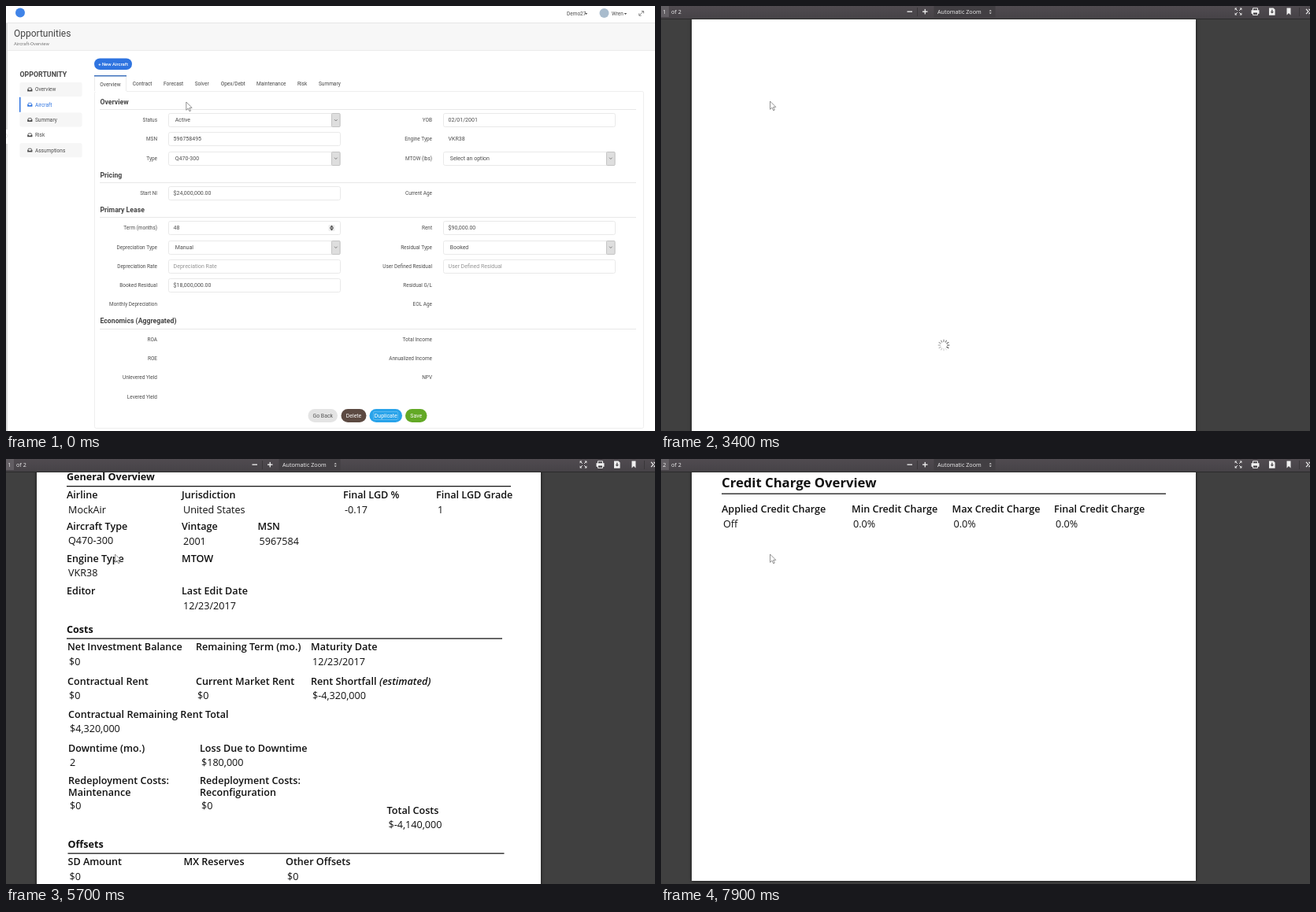
Animation, 824 px wide and 540 px high, one loop 8000 ms. Source, as an HTML page with a canvas:

```html
<!DOCTYPE html>
<html lang="en">
<head>
<meta charset="utf-8">
<title>Aircraft risk report</title>
<style>
html, body { margin: 0; width: 100%; height: 100%; overflow: hidden; background: #fff; }
canvas { display: block; width: 824px; height: 540px; }
</style>
</head>
<body>
<canvas id="stage" width="824" height="540"></canvas>
<script>
const ctx = document.getElementById('stage').getContext('2d');
const LOOP = 8000, STEP = 100;
const UI = 'Roboto, sans-serif', DOC = '"Open Sans", sans-serif';
const INK = '#4c4c4c', BLUE = '#2f74e0';
const PLANE = 'Q470-300', ENGINE = 'VKR38';

// ---------- helpers ----------
function text(s, x, y, size, color = INK, weight = 400, font = UI, align = 'left') {
  // laid out large and scaled down, so advances keep their fractions
  ctx.save();
  ctx.translate(x, y + size * 0.357);
  ctx.scale(0.125, 0.125);
  ctx.font = `${weight} ${size * 8}px ${font}`;
  ctx.textAlign = align;
  ctx.fillStyle = color;
  ctx.fillText(s, 0, 0);
  ctx.restore();
}

function rect(x, y, w, h, color) {
  ctx.fillStyle = color;
  ctx.fillRect(x, y, w, h);
}

function box(x, y, w, h, r, fill, stroke) {
  ctx.beginPath();
  ctx.roundRect(x, y, w, h, r);
  if (fill) { ctx.fillStyle = fill; ctx.fill(); }
  if (stroke) { ctx.strokeStyle = stroke; ctx.lineWidth = 1; ctx.stroke(); }
}

function poly(points, color) {
  ctx.beginPath();
  points.forEach(([x, y]) => ctx.lineTo(x, y));
  ctx.closePath();
  ctx.fillStyle = color;
  ctx.fill();
}

function line(points, color, width) {
  ctx.beginPath();
  points.forEach(([x, y]) => ctx.lineTo(x, y));
  ctx.strokeStyle = color;
  ctx.lineWidth = width;
  ctx.stroke();
}

function disc(x, y, r, color) {
  ctx.beginPath();
  ctx.arc(x, y, r, 0, 2 * Math.PI);
  ctx.fillStyle = color;
  ctx.fill();
}

const caret = (x, y, s, color, dir = 1) =>
  poly([[x - s, y - s * dir / 2], [x + s, y - s * dir / 2], [x, y + s * dir / 2]], color);

function track(keys, t) {
  if (t <= keys[0][0]) return keys[0][1];
  for (let i = 1; i < keys.length; i++) {
    const [t0, a] = keys[i - 1], [t1, b] = keys[i];
    if (t < t1) return a + (b - a) * (t - t0) / (t1 - t0);
  }
  return keys[keys.length - 1][1];
}

function ease(t, t0, t1) {
  const p = Math.min(1, Math.max(0, (t - t0) / (t1 - t0)));
  return p * p * (3 - 2 * p);
}

function cursor(x, y) {
  ctx.beginPath();
  [[0, 0], [0, 10.3], [2.4, 8.1], [4.2, 11.8], [5.7, 11.1], [4.1, 7.5], [7.3, 7.3]]
    .forEach(([a, b]) => ctx.lineTo(x + a, y + b));
  ctx.closePath();
  ctx.fillStyle = '#fff';
  ctx.fill();
  ctx.strokeStyle = '#777';
  ctx.lineWidth = 0.8;
  ctx.stroke();
}

// ---------- web application ----------
function frame(page) {
  rect(0, 0, 824, 540, '#fff');
  rect(0, 22, 824, 34, '#f7f7f7');
  rect(0, 21, 824, 1, '#e6e6e6');
  rect(0, 56, 824, 1, '#ececec');
  rect(0, 22, 2, 135, '#d9d9d9');
  rect(0, 175, 2, 365, '#d9d9d9');
  line([[0, 162], [2, 165], [0, 168]], '#ddd', 0.8);

  disc(18, 8.5, 6, '#4084e8');
  text('Demo27', 712, 9.5, 6.5);
  caret(736.5, 10, 1.8, INK);
  disc(759.5, 9, 6, '#a9bccd');
  text('Wren', 769, 9.5, 6.5);
  caret(786.5, 10, 1.8, INK);
  line([[804.2, 11.8], [809.2, 6.8]], '#777', 0.8);
  line([[806.8, 6.6], [809.6, 6.6], [809.6, 9.3]], '#777', 0.9);
  line([[803.8, 9.3], [803.8, 12.2], [806.6, 12.2]], '#777', 0.9);

  text('Opportunities', 10, 34.5, 12, '#444');
  text('Aircraft-' + page, 10, 47.5, 5.9, '#777');
  text('OPPORTUNITY', 17.5, 86.5, 8.8, '#444', 700);
  ['Overview', 'Aircraft', 'Summary', 'Risk', 'Assumptions'].forEach(sideItem);

  box(112, 66.5, 48, 14.5, 7.2, BLUE);
  text('+ New Aircraft', 136, 73.8, 5.9, '#fff', 500, UI, 'center');

  box(112.5, 108.5, 697, page === 'Risk' ? 460 : 428, 2, '#fff', '#eee');
  tabs(page);
}

function sideItem(name, i) {
  const y = 106 + i * 19.3, on = i === 1;
  if (i % 2 === 0) box(17.5, y - 9, 79, 18, 2, '#f6f6f6');
  if (on) rect(17, y - 9.5, 1.5, 19, BLUE);
  const color = on ? BLUE : INK;
  line([[27.6, y + 0.3], [28.6, y - 2], [32, y - 2], [33, y + 0.3]], color, 0.8);
  poly([[27.2, y], [29, y], [29.6, y + 0.9], [31, y + 0.9], [31.6, y], [33.4, y],
    [33.4, y + 2.4], [27.2, y + 2.4]], color);
  text(name, 37, y, 6.5, color);
}

function tabs(active) {
  const risk = active === 'Risk';
  const [left, right] = risk ? [362, 390] : [112, 153];
  rect(left, 88, right - left, 21, '#fff');
  rect(left, 88, 1, 20, '#ececec');
  rect(right - 1, 88, 1, 20, '#ececec');
  rect(left, 88, right - left, 1.5, '#3f72bd');
  const names = ['Overview', 'Contract', 'Forecast', 'Solver', 'Opex/Debt', 'Maintenance', 'Risk', 'Summary'];
  const at = [119.3, 160.7, 200, 239.7, 272.7, 318, 370, 397];
  names.forEach((n, i) => {
    const shift = risk && i > 0 && i < 6 ? -0.6 : 0;
    text(n, at[i] + shift, n === active ? 99.3 : 98.3, 6.5, '#444');
  });
}

function section(name, y) {
  text(name, 119.5, y, 8.7, '#444', 700);
  rect(119, Math.round(y + 9.5), 681, 1, '#e8e8e8');
}

// kinds: i input, p placeholder, s select, none plain
function row(side, y, label, value = '', kind = '') {
  const x = side ? 556 : 207;
  label.split('|').forEach((part, i) => text(part, x - 15, y + i * 10, 6.45, INK, 400, UI, 'right'));
  if (kind) box(x - 0.5, Math.round(y) - 8.5, 218, 17, 2, '#fff', '#e9e9e9');
  if (kind === 's') {
    const top = Math.round(y) - 8.5;
    box(x + 206.5, top, 10.5, 17, 1, '#dedede', '#c4c4c4');
    line([[x + 210, y - 0.8], [x + 211.8, y + 1], [x + 213.6, y - 0.8]], '#666', 0.8);
  }
  text(value, x + (kind === 's' ? 7.8 : 5.6), y, 7, kind === 'p' ? '#949494' : INK);
}

function stepper(x, y) {
  caret(x, y - 2.3, 2, '#333', -1);
  caret(x, y + 2.3, 2, '#333');
}

function pill(x, w, label, fill, color = '#fff') {
  box(x, 512, w, 17, 8.5, fill);
  text(label, x + w / 2, 520.7, 6.9, color, 400, UI, 'center');
}

function overview() {
  frame('Overview');
  section('Overview', 121.5);
  row(0, 145, 'Status', 'Active', 's');
  row(1, 145, 'YOB', '02/01/2001', 'i');
  row(0, 169, 'MSN', '596758495', 'i');
  row(1, 169, 'Engine Type', ENGINE);
  row(0, 193.5, 'Type', PLANE, 's');
  row(1, 193.5, 'MTOW (lbs)', 'Select an option', 's');
  section('Pricing', 214.5);
  row(0, 238, 'Start NI', '$24,000,000.00', 'i');
  row(1, 238, 'Current Age');
  section('Primary Lease', 258.5);
  row(0, 282, 'Term (months)', '48', 'i');
  box(409.5, 278, 8, 8, 1, '#eee');
  stepper(413.5, 282);
  rect(411, 281.5, 5, 1, '#333');
  row(1, 282, 'Rent', '$90,000.00', 'i');
  row(0, 306.5, 'Depreciation Type', 'Manual', 's');
  row(1, 306.5, 'Residual Type', 'Booked', 's');
  row(0, 331, 'Depreciation Rate', 'Depreciation Rate', 'p');
  row(1, 331, 'User Defined Residual', 'User Defined Residual', 'p');
  row(0, 355, 'Booked Residual', '$18,000,000.00', 'i');
  row(1, 355, 'Residual G/L');
  row(0, 379, 'Monthly Depreciation');
  row(1, 379, 'EOL Age');
  section('Economics (Aggregated)', 400);
  ['ROA', 'ROE', 'Unlevered Yield', 'Levered Yield'].forEach((s, i) => row(0, 423.7 + i * 24.2, s));
  ['Total Income', 'Annualized Income', 'NPV'].forEach((s, i) => row(1, 423.7 + i * 24.2, s));
  pill(383.5, 37.5, 'Go Back', '#e4e4e4', '#555');
  pill(425.5, 32, 'Delete', '#5c4a42');
  pill(461.5, 41.5, 'Duplicate', '#28a3ea');
  ctx.setLineDash([1, 1]);
  box(466.5, 515.5, 31, 10, 1, null, '#8accf2');
  ctx.setLineDash([]);
  pill(507, 27.5, 'Save', '#63a926');
}

function risk() {
  frame('Risk');
  section('General', 128.7);
  row(0, 152.5, 'Analyst', 'Analyst', 'p');
  box(412.5, 149.5, 7, 6, 0.5, null, '#888');
  line([[413.5, 152.5], [415, 152.5]], '#777', 2);
  line([[416, 151.5], [418.5, 151.5]], '#777', 0.7);
  line([[416, 153.5], [418.5, 153.5]], '#777', 0.7);
  row(1, 152.5, 'Type', PLANE);
  row(0, 176.5, 'YOB', '02/01/2001');
  row(1, 176.5, 'Jurisdiction', 'United States');
  section('Costs', 197.7);
  row(0, 221, 'Contract Remaining Rent', '$4,320,000.00');
  row(1, 221, 'Lost Rents Downtime', '$180,000.00');
  row(0, 245, 'Rent Shortfall', '-$4,320,000.00');
  row(1, 245, 'Redeployment Cost|Maint', 'Redeployment Cost Maint', 'p');
  row(0, 276, 'Risk Downtime', '2');
  row(1, 276, 'Total Costs', '-$4,140,000.00');
  section('Offsets', 296.7);
  row(0, 320.3, 'Maintenance Reserve');
  row(1, 320.3, 'Total Costs Less|Security', '-$4,140,000.00');
  row(0, 351, 'Other Offsets', 'Other Offsets', 'p');
  section('Net Loss', 371.7);
  row(0, 395.5, 'LGD', '-0.17');
  row(1, 395.5, 'LGD Grade', '-0.17');
  row(0, 420, 'Loss Adjustment', '0%', 'i');
  stepper(420, 420);
  row(1, 420, 'LGD Mapping', '1');
  section('PD', 440.5);
  row(0, 464, 'Final PD Score');
  row(1, 464, 'Final PD Grade');
  section('Credit Charge', 485);
  row(0, 508.3, 'Min Credit Charge', '0.000%', 'i');
  row(1, 508.3, 'Apply Credit Charge', 'Off', 's');
  row(0, 533, 'Max Credit Charge', '0.000%', 'i');
  row(1, 533, 'Final Credit Charge', '0.000%');
}

function statusBar() {
  rect(0, 528, 132, 12, '#d0d0d0');
  rect(0, 529, 131, 11, '#f3f3f3');
  text('app.com/#/opportunities/aircrafts/risk', 0.7, 535.5, 7.05, '#444', 400, DOC);
}

// ---------- report viewer ----------
const PAGE_TOP = 17, PAGE_H = 827, PAGE_GAP = 7, PAGE_X = 39, PAGE_W = 640;

function doc(s, x, y, size = 12.6, weight = 400) {
  text(s, x, y, size, '#111', weight, DOC);
}

function field(x, y, label, value = '') {
  doc(label, x, y, 12.6, 600);
  doc(value, x + 2, y + 18.4);
}

const rule = (x, y, end) => rect(x, y, end - x, 1.3, '#1a1a1a');

function heading(s, y) {
  doc(s, 77, y, 16.7, 700);
  rule(77, y + 13, 641);
}

function group(s, x, y, end) {
  doc(s, x, y, 12.6, 700);
  rule(x, y + 11, end);
}

function sheet(y) {
  ctx.save();
  ctx.shadowColor = 'rgba(0,0,0,.75)';
  ctx.shadowBlur = 4;
  rect(PAGE_X, y, PAGE_W, PAGE_H, '#fff');
  ctx.restore();
}

function titleBand() {
  poly([[39, 30], [405, 30], [371, 68], [39, 68]], '#cecece');
  poly([[645, 30], [679, 30], [679, 68], [611, 68]], '#cecece');
  doc('Aircraft LGD Summary', 67.5, 49, 24, 700);
  doc('Report Date:', 77, 86, 12.6, 600);
  doc('12/23/2017', 189, 86);
}

function pageOne() {
  titleBand();
  heading('Loss Given Default (LGD) Overview', 146);
  group('General Overview', 77, 176, 641);
  field(77, 199, 'Airline', 'MockAir');
  field(223, 199, 'Jurisdiction', 'United States');
  field(428, 199, 'Final LGD %', '-0.17');
  field(546, 199, 'Final LGD Grade', '1');
  field(77, 238.5, 'Aircraft Type', PLANE);
  field(223, 239, 'Vintage', '2001');
  field(319.5, 239, 'MSN', '5967584');
  field(77, 279.5, 'Engine Type', ENGINE);
  field(223, 279.5, 'MTOW');
  field(77, 320.7, 'Editor');
  field(223, 320.7, 'Last Edit Date', '12/23/2017');
  group('Costs', 77, 369.5, 630);
  field(78, 392, 'Net Investment Balance', '$0');
  field(241, 391.5, 'Remaining Term (mo.)');
  field(387, 391.7, 'Maturity Date', '12/23/2017');
  field(78, 435.5, 'Contractual Rent', '$0');
  field(241, 435.5, 'Current Market Rent', '$0');
  field(387, 435.5, 'Rent Shortfall', '$-4,320,000');
  doc('(estimated)', 474, 435.5, 12.6, 'italic 600');
  field(79, 477.3, 'Contractual Remaining Rent Total', '$4,320,000');
  field(79, 520.5, 'Downtime (mo.)', '2');
  field(246, 520.5, 'Loss Due to Downtime', '$180,000');
  [[79, 'Maintenance'], [246, 'Reconfiguration']].forEach(([x, s]) => {
    doc('Redeployment Costs:', x, 561.3, 12.6, 600);
    doc(s, x, 576.5, 12.6, 600);
    doc('$0', x + 2, 593.2);
  });
  field(483.5, 599.3, 'Total Costs', '$-4,140,000');
  group('Offsets', 78.5, 642.5, 632.5);
  field(78.5, 664.8, 'SD Amount', '$0');
  field(225.5, 664.8, 'MX Reserves');
  field(355, 664.8, 'Other Offsets', '$0');
  field(483.5, 719, 'Total Costs Less Security', '$-4,140,000');
  field(428, 767, 'Base LGD %', '-17.0%');
  field(546, 767, 'Base LGD Grade');
}

function pageTwo() {
  titleBand();
  heading('Probability of Default (PD) Overview', 146);
  field(77, 179, 'Final PD Score');
  field(242, 179, 'Final PD Grade');
  heading('Credit Charge Overview', 321.5);
  field(77, 354.7, 'Applied Credit Charge', 'Off');
  field(242, 354.7, 'Min Credit Charge', '0.0%');
  field(369.5, 354.7, 'Max Credit Charge', '0.0%');
  field(499, 354.7, 'Final Credit Charge', '0.0%');
}

function loader(x, y, t) {
  const lead = 1 + Math.floor(t / 100);
  for (let i = 0; i < 12; i++) {
    const a = i * Math.PI / 6, age = (lead - i + 24) % 12;
    const c = Math.cos(a), s = Math.sin(a);
    line([[x + 4 * c, y + 4 * s], [x + 7.3 * c, y + 7.3 * s]],
      `rgba(40,40,40,${0.85 - age * 0.065})`, 1.1);
  }
}

function toolbar(page) {
  const g = ctx.createLinearGradient(0, 0, 0, 16);
  g.addColorStop(0, '#504b50');
  g.addColorStop(1, '#464347');
  rect(0, 0, 824, 16, g);
  rect(0, 16, 824, 1, '#2b2b2b');
  const ink = '#f0f0f0';
  rect(0, 0, 10, 14, '#625e63');
  text(String(page), 2.3, 7.3, 7.2, ink, 400, DOC);
  text('of 2', 13, 7.3, 7.2, ink, 400, DOC);
  rect(312.5, 6.5, 6.5, 1.3, ink);
  rect(332, 6.5, 6.5, 1.3, ink);
  rect(334.6, 3.9, 1.3, 6.5, ink);
  rect(325, 2, 1, 11, '#3a373a');
  rect(346.5, 0, 78, 14.5, '#423f43');
  text('Automatic Zoom', 351, 7.5, 7.2, ink, 400, DOC);
  caret(418.2, 5.7, 1.6, ink, -1);
  caret(418.2, 9.3, 1.6, ink);

  // expand
  [[-1, -1], [1, -1], [-1, 1], [1, 1]].forEach(([a, b]) => {
    const x = 733, y = 7;
    line([[x + 1.2 * a, y + 1.2 * b], [x + 3.8 * a, y + 3.8 * b]], ink, 1);
    poly([[x + 4.4 * a, y + 4.4 * b], [x + 1.6 * a, y + 4.4 * b], [x + 4.4 * a, y + 1.6 * b]], ink);
  });
  // printer
  rect(749.5, 5.2, 10, 4.6, ink);
  box(751.5, 2.8, 6, 3, 0, '#474448', ink);
  box(751.5, 8, 6, 3.4, 0, '#474448', ink);
  // download
  poly([[772, 2.5], [777.5, 2.5], [779.6, 4.6], [779.6, 11.7], [772, 11.7]], ink);
  rect(775.2, 4.7, 1.3, 3, '#474448');
  caret(775.85, 8.4, 2.2, '#474448');
  // bookmark
  poly([[794.5, 2.5], [799.5, 2.5], [799.5, 11.5], [797, 9], [794.5, 11.5]], ink);
  rect(810, 2, 1, 11, '#3a373a');
  [819, 822.5].forEach(x => line([[x, 3.8], [x + 3, 7], [x, 10.2]], ink, 1.2));
}

const SCROLL = [[4600, 0], [4700, 36], [4800, 54], [4900, 63], [5000, 67], [5100, 67],
  [5700, 170], [6000, 270], [6300, 372], [6600, 600], [6900, 796], [7300, 802],
  [7500, 802], [7600, 1085], [7700, 1142]];

function viewer(t) {
  const scroll = Math.round(track(SCROLL, t));
  rect(0, 0, 824, 540, '#404040');
  [pageOne, pageTwo].forEach((draw, i) => {
    const y = PAGE_TOP - scroll + i * (PAGE_H + PAGE_GAP);
    if (y > 540 || y + PAGE_H < 0) return;
    sheet(y);
    if (t < 4000) return loader(359, y + 414, t - 3400);
    ctx.save();
    ctx.translate(0, y);
    draw();
    ctx.restore();
  });
  toolbar(scroll > 560 ? 2 : 1);
}

// ---------- timeline ----------
function draw(t) {
  if (t >= 3400) viewer(t);
  else if (t >= 1000) risk();
  else overview();
  if (t >= 800 && t < 2500) statusBar();

  const a = ease(t, 0, 1000), b = ease(t, 2300, 3200);
  cursor(228.8 + 155.4 * a - 245.7 * b, 122 - 22 * a + 21 * b);
}

function tick(now) {
  draw(Math.floor((now % LOOP) / STEP) * STEP);
  requestAnimationFrame(tick);
}
requestAnimationFrame(tick);
</script>
</body>
</html>
```
